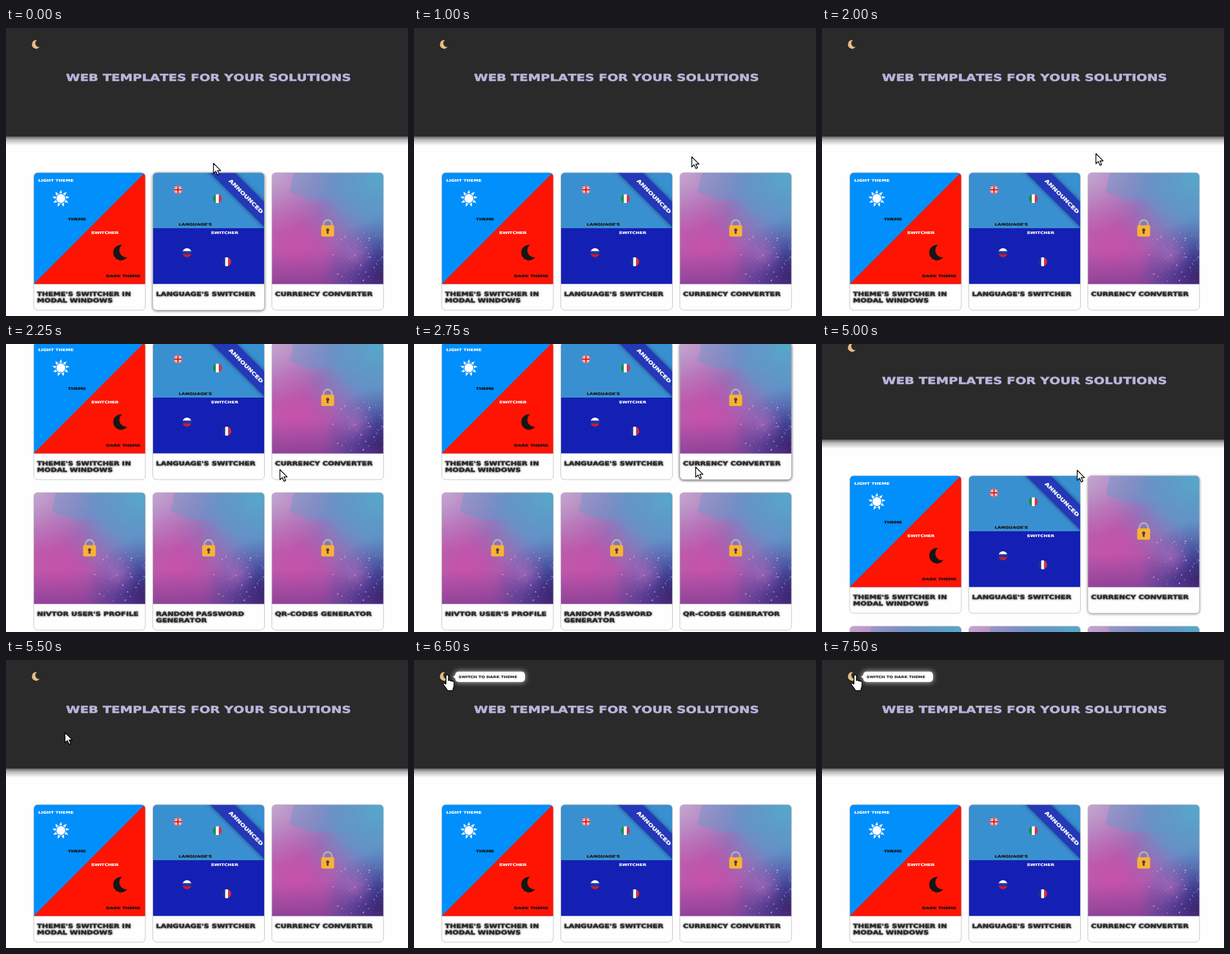
An HTML page for the animation above (8000 ms loop, 623 px wide and 446 px high).

```html
<!DOCTYPE html>
<html lang="en">
<head>
<meta charset="utf-8">
<title>Web templates</title>
<style>
html, body { margin: 0; width: 100%; height: 100%; overflow: hidden; background: #fefefe; }
svg { display: block; }
text { font-family: "DejaVu Sans", sans-serif; font-weight: 700; font-kerning: none; text-rendering: geometricPrecision; stroke-width: .035em; }
.name { filter: drop-shadow(.5px .5px 1.6px rgba(30, 35, 30, .85)); }
.glow { filter: drop-shadow(0 1px 2px rgba(0, 0, 0, .8)); }
.bubble { filter: drop-shadow(0 0 4px rgba(255, 255, 255, .8)); }
.ribbon { filter: drop-shadow(0 0 3px rgba(10, 20, 90, .7)); }
</style>
</head>
<body>
<svg id="stage" width="623" height="446" viewBox="0 0 623 446"></svg>
<script>
const LOOP = 8000;
const WIDE = 1.31; // the typeface is an extended cut
const DARK = '#2a2a2a';
const ART = 172.4;

function label(x, y, size, str, fill, attrs = '') {
  return `<text transform="translate(${x} ${y}) scale(${WIDE} 1)" font-size="${size}" fill="${fill}" stroke="${fill}" ${attrs}>${str}</text>`;
}

function rect(x, y, w, h, fill, attrs = '') {
  return `<rect x="${x}" y="${y}" width="${w}" height="${h}" fill="${fill}" ${attrs}/>`;
}

function path(d, fill, attrs = '') {
  return `<path d="${d}" fill="${fill}" ${attrs}/>`;
}

function gradient(id, stops, attrs, kind = 'linear') {
  const list = stops.map(([at, color, alpha = 1]) =>
    `<stop offset="${at}" stop-color="${color}" stop-opacity="${alpha}"/>`).join('');
  return `<${kind}Gradient id="${id}" ${attrs}>${list}</${kind}Gradient>`;
}

function seeded(seed) {
  return () => (seed = (seed * 16807) % 2147483647) / 2147483647;
}

function crescent(cx, cy, r, fill) {
  const d = `M${.2 * r} ${-r}A${r} ${r} 0 1 0 ${.86 * r} ${.58 * r}A${.88 * r} ${.88 * r} 0 0 1 ${.2 * r} ${-r}Z`;
  return path(d, fill, `transform="translate(${cx} ${cy})"`);
}

function sun(cx, cy) {
  let rays = '';
  for (let i = 0; i < 9; i++) {
    rays += path('M-2.3 -7.6Q0 -8.8 2.3 -7.6Q.4 -10 .9 -13.6Q-1.8 -11 -2.3 -7.6Z', '#fff', `transform="rotate(${i * 40})"`);
  }
  return `<g transform="translate(${cx} ${cy})"><circle r="6.9" fill="#fff"/>${rays}</g>`;
}

function flag(cx, cy, body) {
  return `<g transform="translate(${cx} ${cy})" clip-path="url(#disc)">${body}</g>`;
}

function stripes(colors, across) {
  const s = 14 / 3;
  return colors.map((c, i) => across
    ? rect(-7, -7 + i * s, 14, s + .1, c)
    : rect(-7 + i * s, -7, s + .1, 14, c)).join('');
}

function union() {
  const line = (d, color, w) => path(d, 'none', `stroke="${color}" stroke-width="${w}"`);
  const x = 'M-7 -7L7 7M-7 7L7 -7', plus = 'M-7 0H7M0 -7V7';
  return rect(-7, -7, 14, 14, '#1c2f86') + line(x, '#fff', 2.6) + line(x, '#d22', 1) +
    line(plus, '#fff', 4.4) + line(plus, '#d22', 2.4);
}

function themeArt() {
  return rect(0, 0, 173, ART, '#008ffb') + path(`M173 -.8V${ART}H-.2Z`, '#ff1404') +
    sun(42, 40) + crescent(134.5, 124, 12, '#151515') +
    label(7, 13.7, 5.5, 'LIGHT THEME', '#fff') + label(53, 73.5, 5.5, 'THEME', '#111') +
    label(89, 95, 5.5, 'SWITCHER', '#fff') + label(112, 161.5, 5.5, 'DARK THEME', '#111');
}

function languageArt() {
  return rect(0, 0, 173, 86, '#3990d0') + rect(0, 86, 173, ART - 86, '#1420b4') +
    path('M79 -10L183 94V56L117 -10Z', '#2438b8', 'class="ribbon"') +
    `<g transform="translate(144.5 36.5) rotate(45)">${label(0, 2.8, 7.6, 'ANNOUNCED', '#fff', 'text-anchor="middle"')}</g>` +
    flag(39, 26.5, union()) +
    flag(100, 40.3, stripes(['#1c8c4a', '#fff', '#d8303a'])) +
    flag(53, 124, stripes(['#fff', '#22349c', '#c8202c'], true)) +
    flag(114.5, 138, stripes(['#20308e', '#fff', '#e02c34'])) +
    label(40, 81.5, 5.5, "LANGUAGE'S", '#161616') + label(90, 95, 5.5, 'SWITCHER', '#fff');
}

function nebula() {
  const rnd = seeded(77);
  let stars = '';
  for (let i = 0; i < 130; i++) {
    const x = 173 - 80 * rnd() ** 1.5, y = 168 - 75 * rnd();
    const r = .3 + .9 * rnd() ** 3;
    const fill = rnd() < .5 ? '#ffe2f4' : '#b9a8ec';
    stars += `<circle cx="${x.toFixed(1)}" cy="${y.toFixed(1)}" r="${r.toFixed(2)}" fill="${fill}" opacity="${(.35 + .6 * rnd()).toFixed(2)}"/>`;
  }
  const layers = ['sweep', 'rose', 'teal', 'lilac', 'night', 'haze', 'dusk'];
  return layers.slice(0, 4).map(id => rect(0, 0, 173, ART, `url(#${id})`)).join('') +
    path('M34 0L28 30L60 42H138V14L125 0Z', '#5f98c8', 'opacity=".4"') +
    path('M120 0L173 50V110L100 50Z', '#5a9cca', 'opacity=".15"') +
    layers.slice(4).map(id => rect(0, 0, 173, ART, `url(#${id})`)).join('') + stars;
}

function padlock() {
  return path('M80 82V80a6.6 6.6 0 0 1 13.2 0V82', 'none', 'stroke="#a3b6bd" stroke-width="2.6"') +
    rect(76.5, 81.5, 20, 17.5, '#f9b233', 'rx="2"') +
    '<circle cx="86.5" cy="88.8" r="2.5" fill="#46434c"/>' + path('M85.6 89h1.8l.8 5.6h-3.4z', '#46434c');
}

function card(col, row, art, lines, id = '') {
  const names = lines.map((s, i) => label(5, 191.4 + i * 10, 8.75, s, DARK)).join('');
  const glow = id ? rect(0, 0, 173, 213, '#fff', `id="${id}" class="glow" rx="6" opacity="0"`) : '';
  return `<g transform="translate(${43 + col * 184.5} ${224 + row * 233})">${glow}
    <g clip-path="url(#round)">${rect(0, 0, 173, 213, '#fefefe')}${art}</g>
    ${rect(0, 0, 173, 213, 'none', 'rx="6" stroke="#bcbcbc" stroke-width=".8"')}
    <g class="name">${names}</g></g>`;
}

const locked = '<use href="#locked"/>';
const stage = document.getElementById('stage');
const $ = id => document.getElementById(id);

stage.innerHTML = `<defs>
  <clipPath id="round"><rect width="173" height="213" rx="6"/></clipPath>
  <clipPath id="disc"><circle r="7"/></clipPath>
  ${gradient('fall', [[0, '#000', .62], [.35, '#000', .28], [1, '#000', 0]], 'x2="0" y2="1"')}
  ${gradient('sweep', [[0, '#c08cc4'], [.5, '#a070bc'], [1, '#6a70b8']], 'x2="1" y2=".3"')}
  ${gradient('rose', [[0, '#c850a8', .95], [.55, '#b852a8', .75], [1, '#a858b0', 0]], 'cx=".22" cy=".68" r=".72"', 'radial')}
  ${gradient('teal', [[0, '#54aacb', .95], [.5, '#5f9cca', .7], [1, '#7a8cc4', 0]], 'cx=".95" cy=".05" r=".8"', 'radial')}
  ${gradient('lilac', [[0, '#c4a8d0', .9], [1, '#b89ccc', 0]], 'cx="0" cy="0" r=".55"', 'radial')}
  ${gradient('night', [[0, '#1c1e5c', 1], [.4, '#33348a', .8], [1, '#4a58a8', 0]], 'cx="1" cy=".95" r=".55"', 'radial')}
  ${gradient('haze', [[0, '#c070c0', .6], [1, '#b068c0', 0]], 'cx=".74" cy=".74" r=".2"', 'radial')}
  ${gradient('dusk', [[.7, '#6a2c84', 0], [1, '#6a2c84', .5]], 'x2="0" y2="1"')}
  <g id="locked">${nebula()}${padlock()}</g>
</defs>
${rect(0, 0, 623, 446, '#fefefe')}
<g id="page">
  ${rect(0, 168, 623, 14, 'url(#fall)')}
  ${rect(0, 0, 623, 168, DARK)}
  ${crescent(46.5, 25.5, 6.6, '#e6bd85')}
  ${label(93, 81.7, 15, 'WEB TEMPLATES FOR YOUR SOLUTIONS', '#b7b5da')}
  ${card(0, 0, themeArt(), ["THEME'S SWITCHER IN", 'MODAL WINDOWS'])}
  ${card(1, 0, languageArt(), ["LANGUAGE'S SWITCHER"], 'glowB')}
  ${card(2, 0, locked, ['CURRENCY CONVERTER'], 'glowC')}
  ${card(0, 1, locked, ["NIVTOR USER'S PROFILE"])}
  ${card(1, 1, locked, ['RANDOM PASSWORD', 'GENERATOR'])}
  ${card(2, 1, locked, ['QR-CODES GENERATOR'])}
  <g id="tip"><g class="bubble">${rect(64, 18, 108, 16, '#fff', 'rx="5"')}${path('M65 22.5L60.5 26L65 29.5Z', '#fff')}</g>
  ${label(69, 28, 4.95, 'SWITCH TO DARK THEME', DARK)}</g>
</g>
<g id="cursor" fill="#fff" stroke="#000" stroke-width="1.2" stroke-linejoin="round">
  <path id="arrow" d="M.5 .5V16.2L4.2 12.8L6.8 18.6L9.4 17.4L6.8 11.8H11.8Z"/>
  <path id="hand" transform="translate(-6.9 -.7)" d="M5 15V2.6a1.9 1.9 0 0 1 3.8 0V9.6a1.8 1.8 0 0 1 3.2 .6a1.7 1.7 0 0 1 2.8 .9a1.5 1.5 0 0 1 2.6 1.2V17c0 3-1.8 4.5-1.8 8H7c0-2.5-4-6-6-9.5c-.8-1.6 1-2.6 2.2-1.4z"/>
</g>`;

// Every track holds its value until the next entry.
const pointer = [
  [0, 321, 209], [500, 358, 221], [750, 419, 202], [1000, 430, 199], [1250, 440, 198],
  [1500, 430, 196], [1750, 423, 194], [2000, 424, 194], [2500, 432, 178], [2750, 436, 190],
  [3500, 442, 186], [4000, 442, 185], [4250, 452, 178], [4500, 424, 204], [4750, 405, 196],
  [5000, 395, 195], [5250, 374, 195], [5500, 91, 112], [5750, 45, 47], [6000, 46, 36], [6250, 51.5, 23]
];
const scroll = [[0, 0], [2250, 227], [5000, 20], [5250, 0]];
const glowB = [[0, .8], [250, 0]];
const glowC = [[0, 0], [2500, 1], [4750, .9], [5000, .6], [5250, 0]];
const tip = [[0, 0], [6250, .5], [6500, 1]];

const at = (track, t) => track.findLast(k => k[0] <= t);

function draw(t) {
  const [, x, y] = at(pointer, t);
  const hand = t >= 6000;
  $('page').setAttribute('transform', `translate(0 ${-at(scroll, t)[1]})`);
  $('cursor').setAttribute('transform', `translate(${x} ${y})`);
  $('arrow').setAttribute('visibility', hand ? 'hidden' : 'visible');
  $('hand').setAttribute('visibility', hand ? 'visible' : 'hidden');
  $('glowB').setAttribute('opacity', at(glowB, t)[1]);
  $('glowC').setAttribute('opacity', at(glowC, t)[1]);
  $('tip').setAttribute('opacity', at(tip, t)[1]);
}

const start = performance.now();
function frame() {
  draw((performance.now() - start) % LOOP);
  requestAnimationFrame(frame);
}
frame();
</script>
</body>
</html>
```
